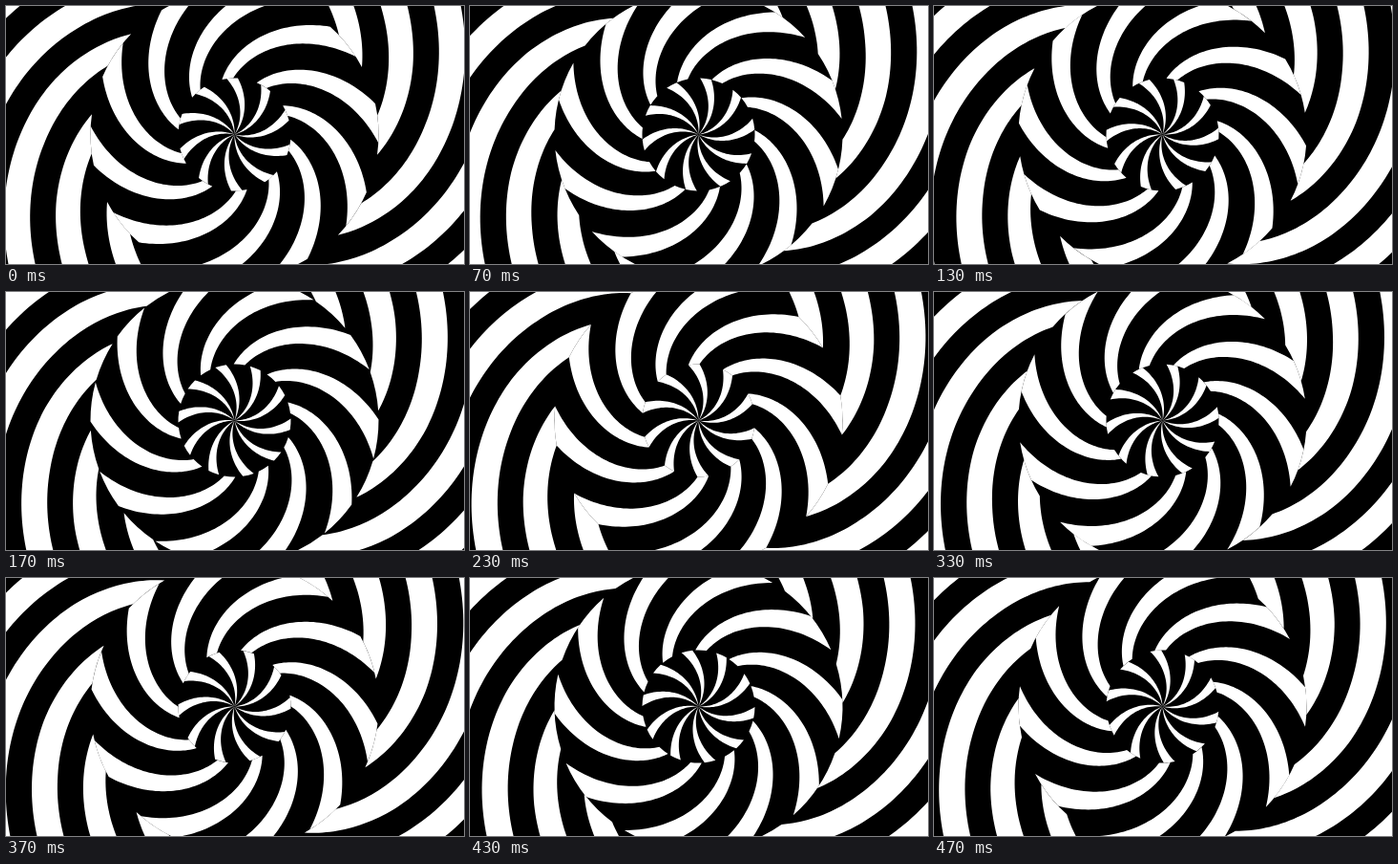
These frames come from a looping animation (480x270 px, 510 ms). An HTML page with a canvas:

```html
<!DOCTYPE html>
<html lang="en">
<head>
<meta charset="utf-8">
<title>Counter-rotating spiral</title>
<style>
  html, body { margin: 0; width: 100%; height: 100%; overflow: hidden; background: #000; }
  canvas { display: block; width: 480px; height: 270px; }
</style>
</head>
<body>
<canvas id="stage" width="480" height="270"></canvas>
<script>
const ctx = document.getElementById('stage').getContext('2d');
const ARMS = 10, GAP = 360 / ARMS;
const LOOP = 510, STEPS = 15, TURN = 2 * GAP / STEPS;
const TWIST = 0.615; // degrees per pixel of radius
const radii = [0, 59, 151, 290];
const rad = deg => deg * Math.PI / 180;

// Half the angular width of a white arm
const half = r => GAP / 2 * Math.min(0.5, 0.24 + 0.0013 * r);

function armPath(from, to, start, twist) {
  const path = new Path2D();
  const edge = (r, side) => rad(start + twist * (r - from) + side * half(r));
  const point = (r, side) => path.lineTo(r * Math.cos(edge(r, side)), r * Math.sin(edge(r, side)));
  const n = Math.ceil((to - from) / 2);
  const radius = i => from + (to - from) * i / n;
  for (let i = 0; i <= n; i++) point(radius(i), -1);
  path.arc(0, 0, to, edge(to, -1), edge(to, 1));
  for (let i = n; i >= 0; i--) point(radius(i), 1);
  if (from) path.arc(0, 0, from, edge(from, 1), edge(from, -1), true);
  path.closePath();
  return path;
}

// The arms form one zigzag: each ring twists and spins against its neighbour.
let angle = 13.3 + TWIST * radii[1];
const rings = radii.slice(1).map((to, i) => {
  const from = radii[i], spin = i % 2 ? -1 : 1;
  const path = armPath(from, to, angle, -spin * TWIST);
  angle -= spin * TWIST * (to - from);
  return { path, spin };
});

function draw(step) {
  ctx.setTransform(1, 0, 0, 1, 0, 0);
  ctx.fillStyle = '#000';
  ctx.fillRect(0, 0, 480, 270);
  ctx.fillStyle = '#fff';
  for (const { path, spin } of rings) {
    ctx.setTransform(1, 0, 0, 1, 239.5, 134.5);
    ctx.rotate(rad(spin * (step + 0.5) * TURN));
    for (let i = 0; i < ARMS; i++) {
      ctx.fill(path);
      ctx.rotate(rad(GAP));
    }
  }
}

// 30 steps per second, with changes on whole hundredths of a second
function stepAt(ms) {
  const ticks = Math.floor(ms % LOOP / 10);
  return Math.min(STEPS - 1, Math.floor((ticks + 0.34) * 0.3));
}

const begin = performance.now();
function frame() {
  draw(stepAt(Math.max(0, performance.now() - begin)));
  requestAnimationFrame(frame);
}
frame();
</script>
</body>
</html>
```
